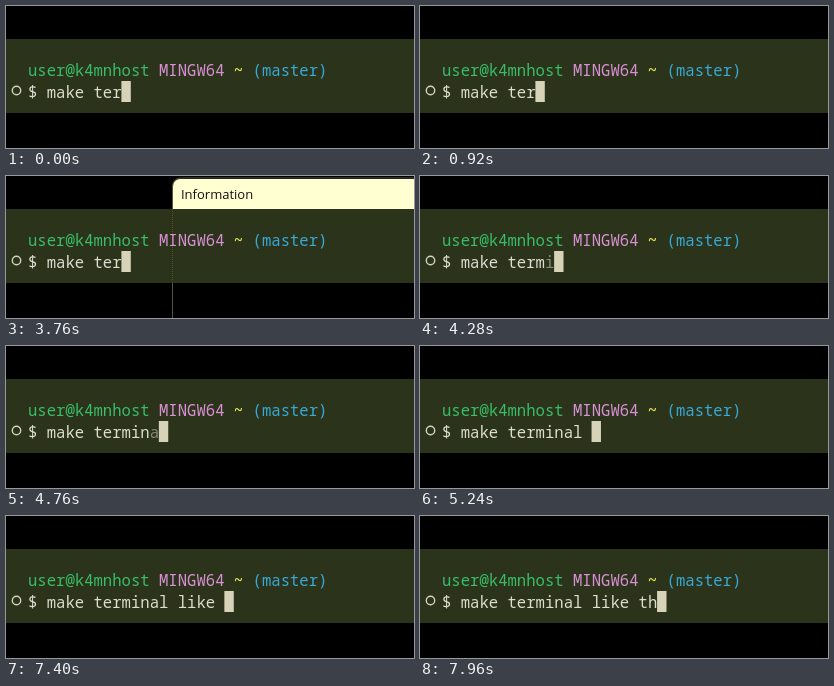
These frames come from a looping animation (408 by 142 pixels, 8 s). An HTML page:

```html
<!DOCTYPE html>
<html lang="en">
<head>
<meta charset="utf-8">
<title>Typing in a terminal</title>
<style>
  html, body { margin: 0; width: 100%; height: 100%; overflow: hidden; background: #000; }
  svg { display: block; width: 408px; height: 142px; }
  text { white-space: pre; }
  .term { font: 500 15.6px "Noto Sans Mono", "DejaVu Sans Mono", monospace; }
  .tip { font: 13px "Open Sans", "Noto Sans", sans-serif; }
</style>
</head>
<body>
<svg viewBox="0 0 408 142">
  <rect width="408" height="142" fill="#000"/>
  <g id="tip">
    <path d="M166.5 142V10a8 8 0 0 1 8-8H408" fill="none" stroke="#55553c"/>
    <path d="M167 33V10a7 7 0 0 1 7-7H408V33Z" fill="#ffffd2"/>
    <text class="tip" x="175" y="23" fill="#111">Information</text>
  </g>
  <rect y="33" width="408" height="74" fill="#2b341b"/>
  <path id="edge" d="M166.5 33V107" stroke="#4c502c" stroke-dasharray="1 1"/>
  <circle cx="10.5" cy="84.5" r="4.2" fill="none" stroke="#d2d2be" stroke-width="1.4"/>
  <g class="term">
    <text x="22" y="70"><tspan fill="#38bd68">user@k4mnhost</tspan><tspan fill="#d88fd4"> MINGW64</tspan><tspan fill="#e0e058" font-weight="700"> ~</tspan><tspan fill="#38a8d4"> (master)</tspan></text>
    <text id="line" x="22" y="91.5" fill="#dcdcd0">$ make ter</text>
  </g>
  <rect id="caret" y="75" width="9.4" height="21" fill="#d6d3b8"/>
</svg>
<script>
const LOOP = 8000, LEFT = 22, CELL = 9.36, START = 10, FADE = 80;
const typed = "minal like th";
const times = [4000, 4240, 4480, 4720, 4960, 5200, 6600, 6800, 6920, 7040, 7200, 7520, 7800];

const byId = id => document.getElementById(id);
const line = byId("line"), caret = byId("caret");
const letters = [...typed].map(ch => {
  const span = document.createElementNS("http://www.w3.org/2000/svg", "tspan");
  span.textContent = ch;
  line.append(span);
  return span;
});

function draw(t) {
  letters.forEach((span, i) => {
    const shown = Math.min(1, Math.max(0, (t - times[i]) / FADE));
    span.setAttribute("fill-opacity", shown);
  });
  const count = times.filter(at => t >= at).length;
  caret.setAttribute("x", LEFT + (START + count) * CELL - 0.2);

  const open = t >= 3760 && t < 3800;
  for (const id of ["tip", "edge"]) byId(id).setAttribute("visibility", open ? "visible" : "hidden");
}

function tick() {
  draw(performance.now() % LOOP);
  requestAnimationFrame(tick);
}
tick();
</script>
</body>
</html>
```
